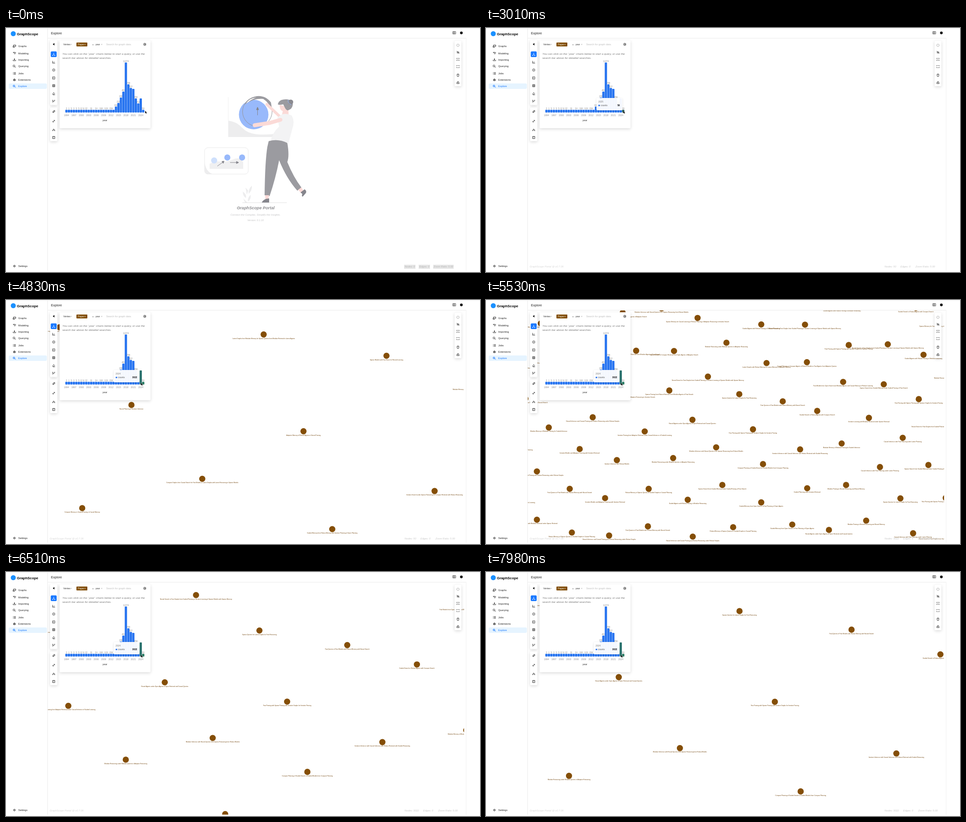
Animation of 1043x537 px, one loop 8000 ms. Source, as an HTML page with a canvas:

```html
<!DOCTYPE html>
<html lang="en">
<head>
<meta charset="utf-8">
<title>Explore</title>
<style>
html, body { margin: 0; width: 100%; height: 100%; overflow: hidden; background: #fff; }
canvas, svg { position: absolute; left: 0; top: 0; }
text { font-family: "Liberation Sans", Arial, sans-serif; white-space: pre; }
.card { fill: #fff; filter: drop-shadow(0 2px 3px rgba(0,0,0,.15)); }
.line { fill: none; stroke: #333; stroke-width: .9; }
.i { font-style: italic; }
.b { font-weight: 700; }
.m { text-anchor: middle; }
</style>
</head>
<body>
<canvas id="graph" width="1043" height="537"></canvas>
<svg width="1043" height="537" viewBox="0 0 1043 537">
  <g stroke="#ececec" fill="none">
    <path d="M0 1.5H1043" stroke="#f4f4f4"/>
    <path d="M91.5 1V534M92 22.5H1012"/>
    <path d="M1012.5 22V534" stroke-dasharray="2 1"/>
  </g>

  <g id="art">
    <path d="M489 204Q507 206 519 219T552 234Q580 236 600 231L590 240H489Z" fill="#ededee"/>
    <path d="M489 204V152M489 239.500H590" stroke="#efefef" fill="none"/>
    <circle cx="545" cy="190.500" r="32.500" fill="#98b9fb"/>
    <circle cx="553" cy="184" r="32.500" fill="none" stroke="#96969c"/>
    <path d="M524 169Q533 153 552 150Q571 148 583 164L586 183Q579 164 566 156Q545 154 524 169Z" fill="#9b9ba0"/>
    <path d="M551 153Q542 156 533 163L528 166Q536 154 551 153Z" fill="#fff"/>
    <path d="M553.500 192V176M551 180L553.500 174L556 180Z" stroke="#85858c" fill="#85858c"/>
    <path d="M607 199L574 168" stroke="#fbdad7" stroke-width="6" stroke-linecap="round"/>
    <path d="M602 169Q602 181 609 183L607 192L622 194L621 174Z" fill="#fbdad7"/>
    <path d="M600 163Q605 156 618 157Q632 158 631 169Q630 178 621 181Q617 182 614 176L610 168Q601 170 598 168Z" fill="#9b9ba0"/>
    <circle cx="626.500" cy="163" r="5.500" fill="#8b8b91"/>
    <path d="M621 158Q619 165 628 169" fill="none" stroke="#98b9fb"/>
    <path d="M607 190Q618 187 629 193Q636 206 630 222L622 252H581Q587 229 601 217L597 197Z" fill="#f3f3f4"/>
    <path d="M604 202L580 209L547 214" fill="none" stroke="#fbdad7" stroke-width="8.500" stroke-linecap="round" stroke-linejoin="round"/>
    <path d="M578 249Q599 243 619 253Q624 281 619 295Q633 329 650 351L641 358Q617 331 601 291Q593 332 580 370L569 368Q570 293 575 262Z" fill="#9b9ba0"/>
    <path d="M570 368H579L577 378H571ZM643 356L650 351L655 359L650 364Z" fill="#fbdad7"/>
    <path d="M563 384Q565 379 572 376L579 375V384ZM648 362L657 355Q662 358 660 363L653 371Q650 371 652 365Z" fill="#85858c"/>
    <path d="M520 384.500H618" stroke="#e2e2e2"/>
    <path d="M527 351L533 358L530 367ZM541 347Q542 357 534 365Q533 354 541 347ZM521 360Q530 366 528 374Q521 370 521 360ZM538 367Q530 376 533 382Q540 376 538 367ZM522 375L531 384H526Z" fill="#ededee"/>
    <rect x="437" y="263.500" width="96" height="58" rx="7" fill="#fff" stroke="#e9e9ea"/>
    <path d="M437 294Q439 316 455 321.500H444Q437 321 437 314Z" fill="#ededee"/>
    <path d="M448 310V299Q460 292 472 294T500 289T522 296V310Z" fill="#f0f0f1"/>
    <circle cx="458" cy="291.500" r="6.700" fill="#cfe0fc"/>
    <circle cx="487" cy="285" r="6.700" fill="#98b9fb"/>
    <circle cx="519.500" cy="285" r="6.700" fill="#98b9fb"/>
    <path d="M465 304L479 294M475 293.500L480 293L478 298ZM493 296H509M507 293.500L512 296L507 298.500Z" stroke="#85858c" fill="#85858c"/>
    <g fill="#8f8f92" class="i m">
      <text x="549.500" y="398.500" font-size="9.200" class="b">GraphScope Portal</text>
      <g fill="#c4c4c6">
        <text x="549" y="413" font-size="5.700">Connect the Complex, Simplify the Insights.</text>
        <text x="549" y="425" font-size="5.400">Version: 0.1.16</text>
      </g>
    </g>
  </g>

  <g id="foot" font-size="5.600" class="i"></g>

  <circle cx="16" cy="12.500" r="5.500" fill="#1a90ff"/>
  <text x="24" y="15.500" font-size="7.900" class="b">GraphScope</text>
  <text x="99" y="14" font-size="7.100" fill="#222">Explore</text>
  <path class="line" d="M983 8H986V13H983ZM986 8H989.500V13H986Z"/>
  <circle cx="1002" cy="10.700" r="3" fill="#111"/>

  <rect x="6" y="122" width="84" height="12" rx="3" fill="#e6f4ff"/>
  <g id="menu" font-size="5.600"></g>

  <rect class="card" x="97" y="26.500" width="16" height="143" rx="2"/>
  <rect class="card" x="97" y="175" width="16" height="74" rx="2"/>
  <rect class="card" x="118" y="27" width="200" height="193.500" rx="2"/>
  <rect class="card" x="987" y="28" width="15" height="100" rx="2"/>
  <path d="M106.500 33V38.500L103 35.700Z"/>
  <rect x="98.500" y="51.500" width="13" height="12.500" rx="2" fill="#1677ff"/>
  <g id="tools"></g>

  <g font-size="5.600" fill="#333">
    <text x="126" y="38">Vertex</text>
    <text x="142" y="38" fill="#999">×</text>
    <rect x="155" y="32" width="24" height="8.500" rx="1" fill="#7f4a00"/>
    <text x="158" y="38" fill="#fff" font-size="5.400">Paper×</text>
    <text x="190" y="38" font-size="5">»</text>
    <text x="197" y="38" font-size="5">year</text>
    <text x="209" y="38" fill="#999">×</text>
    <text x="220.500" y="38" fill="#bcbcbc">Search for graph data.</text>
  </g>
  <circle class="line" cx="305.300" cy="36" r="2.600"/>
  <path class="line" d="M304 36H307M305.500 34.700V37.300"/>
  <g font-size="6.150" fill="#777" class="i">
    <text x="124" y="59">You can click on the `year` charts below to start a query, or use the</text>
    <text x="124" y="67.500">search bar above for detailed searches.</text>
  </g>
  <g id="chart" class="m"></g>
  <text x="217.500" y="205" font-size="5.500" fill="#333" class="m">year</text>

  <g id="tip">
    <rect x="243" y="154" width="57" height="27" rx="2" fill="#fff" opacity=".95" style="filter:drop-shadow(0 1px 2px rgba(0,0,0,.12))"/>
    <text id="tipYear" x="247" y="163.500" font-size="5" fill="#777"></text>
    <circle cx="249" cy="170.500" r="1.800" fill="#2774f0"/>
    <text x="252.500" y="172.300" font-size="5" fill="#555">counts</text>
    <text id="tipCount" x="294.500" y="172.300" font-size="4.800" text-anchor="end" class="b"></text>
  </g>
  <path id="cursor" d="M0 0V6L1.500 4.800L2.500 7L3.600 6.500L2.600 4.400H4.400Z" stroke="#fff" stroke-width=".3"/>
</svg>
<script>
const $ = id => document.getElementById(id);
const text = (x, y, s, extra = '') => `<text x="${x}" y="${y}" ${extra}>${s}</text>`;
const icon = (x, y, d, color = '#333') =>
  `<path class="line" style="stroke:${color}" transform="translate(${x} ${y})" d="${d}"/>`;

const menu = [
  ['Graphs', 39.5, 'M-2 -2H3V1H-2ZM-3 0V3H1'],
  ['Modeling', 55.5, 'M-3 -2H2M-2 -2L1 2M3 -2L1 2'],
  ['Importing', 69.5, 'M0 -3V1M-1.500 -.5L0 1L1.500 -.5M-3 1V2.500H3V1'],
  ['Querying', 84, 'M1 -.5A2 2 0 1 0 -3 -.5A2 2 0 1 0 1 -.5M.5 1L3 3'],
  ['Jobs', 100, 'M-1 -2H3M-1 0H3M-1 2H3M-3 -2H-2M-3 0H-2M-3 2H-2'],
  ['Extensions', 114, 'M-2 -1H2V2H-2ZM-1 -2H1M-1 0H1M-1 1H1'],
  ['Explore', 128, 'M1 -.5A2 2 0 1 0 -3 -.5A2 2 0 1 0 1 -.5M.5 1L3 3M-2 -.5H0'],
  ['Settings', 524, 'M2 0A2 2 0 1 0 -2 0A2 2 0 1 0 2 0M-1 0H1']
];
$('menu').innerHTML = menu.map(([name, y, d]) => {
  const color = name === 'Explore' ? '#1677ff' : '#222';
  return icon(18.5, y, d, color) + text(27, y + 2, name, `fill="${color}"`);
}).join('');

const round = 'M2.700 0A2.700 2.700 0 1 0 -2.700 0A2.700 2.700 0 1 0 2.700 0';
const box = 'M-2.500 -2.500H2.500V2.500H-2.500Z';
const corners = 'M-2.500 -1V-2.500H-1M1 -2.500H2.500V-1M2.500 1V2.500H1M-1 2.500H-2.500V1';
const tools = [
  [57.7, 'M0 -3V0L-3 3M0 0L3 3M-3 3H-1M1 3H3'],
  [75, 'M-2.500 -2.500V2.500H3M-1 1V0M1 1V-1'], [92.5, round + 'M-1 0H1'],
  [110, box + 'M-1 -1L0 0L-1 1'], [127, box + 'M-2 0H2M0 -2V2'],
  [144.5, 'M0 -2.500L2 0L0 2H-2V0ZM-2 2.500H3'], [161, 'M-2 -2V3M2 -2Q2 1 -2 1M-3 -2H-1M1 -2H3'],
  [184, 'M-2 2L2 -2M-2 2H0L3 -1L1 -3L-2 0Z'], [205, 'M-2 2L2 -2M0 -2H2V0M-2 0V2H0'],
  [224, 'M0 -2.500V0M-2 2V0H2V2M-3 2H-1M1 2H3'], [241, box + 'M-1 -1H1M-1 1H0']
];
const sideTools = [
  [38, round], [53, 'M-2 2L-1 -1Q0 -3 2 0L2 2ZM-3 -2L3 3'], [69, corners + 'M-.7 0H.7'],
  [85, corners], [104, 'M-2.500 -2H2.500M-1 -3H1M-2 -2L-1.600 2.500H1.600L2 -2'],
  [120, 'M-2.500 0V2.500H2.500V0ZM-1 -2H2M-2 -1H0']
];
$('tools').innerHTML =
  tools.map(([y, d], i) => icon(105, y, d, i ? '#333' : '#fff')).join('') +
  sideTools.map(([y, d], i) => icon(994.5, y, d, i ? '#333' : '#aaa')).join('');

// Bar chart: one bar per year, 1994 to 2025
const tops = [173, 165, 153, 140, 76, 124, 132, 134, 155, 166, 155, 180];
const counts = '2,1,5,3,5,5,12,6,22,,31,,24,,190,,103,,236,,332,210,246,491,11374,788,827,,256,714,,50'.split(',');
const barX = i => 133 + 5.45 * i;
$('chart').innerHTML = counts.map((n, i) => {
  const x = barX(i), y = i < 20 ? 180 : tops[i - 20];
  return `<rect id="bar${i}" x="${x - 2.5}" y="${y}" width="5" height="${186 - y}" rx="1" fill="#2774f0"/>` +
    text(x, y - 1.5, n, 'font-size="4.700" fill="#888"') +
    (i % 3 ? '' : `<path d="M${x} 186V188" stroke="#ccc" stroke-width=".5"/>` +
      text(x, 193.7, 1994 + i, 'font-size="5" fill="#8a8a92"'));
}).join('');

// Graph nodes: x, y, label width
let seed = 7;
const rand = () => (seed = seed * 16807 % 2147483647) / 2147483647;
const pick = list => list[Math.floor(rand() * list.length)];
const words = {
  a: 'Adaptive,Sparse,Robust,Neural,Causal,Latent,Fast,Modular,Guided,Compact,Iterative,Open'.split(','),
  n: 'Models,Retrieval,Reasoning,Planning,Graphs,Inference,Search,Learning,Agents,Parsing,Queries,Memory'.split(','),
  c: 'for,with,of,in,and,from,under'.split(',')
};
function title(width) {
  const size = width / 1.6;
  let best = '';
  for (let k = 0; k < 40; k++) {
    let s = pick(words.a) + ' ' + pick(words.n);
    while (s.length < size - 10) s += ` ${pick(words.c)} ${pick(words.a)} ${pick(words.n)}`;
    if (Math.abs(s.length - size) < Math.abs(best.length - size)) best = s;
  }
  return best;
}

// Listed nodes fill the view; a sunflower spiral continues outside it
function layout(flat, gap, total) {
  const nodes = [];
  for (let i = 0; i < flat.length; i += 3) nodes.push([flat[i], flat[i + 1], title(flat[i + 2])]);
  const listed = nodes.length;
  for (let i = 0; i < total; i++) {
    const r = gap * Math.sqrt(i + .5), a = i * Math.PI * (3 - Math.sqrt(5));
    const x = 552 + r * Math.cos(a), y = 285 + r * Math.sin(a);
    if (Math.abs(x - 550) > 485 || Math.abs(y - 284) > 262) nodes.push([x, y, nodes[i % listed][2]]);
  }
  return nodes;
}
const small = layout([
  637, 288, 80, 454, 374, 169, 565, 113, 147, 689, 465, 116, 326, 240.5, 60,
  787, 151.5, 79, 404, 31, 178, 874, 396, 133, 237, 427, 79, 196, 100, 90,
  966, 205, 150, 86, 309, 142
], 112, 50);
const large = layout([
  650, 60, 110, 787, 57, 139, 451, 106, 170, 910, 124, 135, 320, 153, 114,
  557.5, 165.5, 82, 705, 190, 100, 822, 222.5, 80, 398.5, 252.5, 109,
  236.5, 292, 132, 604, 285, 121, 997.5, 246, 103, 479, 346, 125, 764, 353, 137,
  905, 333, 87, 333, 382.5, 97, 142, 389.5, 67, 638, 403, 115, 500, 474, 109,
  250, 487, 107, 788, 485, 71, 920, 474, 85, 102, 518.5, 102, 382.5, 524, 87,
  632, 533, 100, 336, 19, 112, 1035, 413, 92, 60, 244, 122, 165, 162, 150
], 75.3, 1600);

const ctx = $('graph').getContext('2d');
ctx.beginPath();
ctx.rect(92, 22, 916, 512);
ctx.clip();
ctx.font = '3.2px "Liberation Sans", Arial, sans-serif';
ctx.textAlign = 'center';

function drawNodes(nodes, scale, cx) {
  for (const [nx, ny, label] of nodes) {
    const x = cx + (nx - cx) * scale, y = 284 + (ny - 284) * scale;
    if (x < -20 || x > 1110 || y < 5 || y > 545) continue;
    ctx.fillStyle = '#844e06';
    ctx.beginPath();
    ctx.arc(x, y, 6.8, 0, 7);
    ctx.fill();
    ctx.fillStyle = '#6b3c00';
    ctx.fillText(label, x, y + 9.8);
  }
}

const clamp = v => Math.max(0, Math.min(1, v));
const ramp = (t, from, to) => clamp((t - from) / (to - from));
const spread = (t, start, tau) => 1 - Math.exp((start - t) / tau);

function footer(t) {
  if (t < 2450) {
    return [['Nodes: 0', 876, 25], ['Edges: 0', 908, 25], ['Zoom Ratio: 5.00', 940, 45]].map(([s, x, w]) =>
      `<rect x="${x}" y="521" width="${w}" height="9" fill="#e6e6e6"/>` +
      text(x + w / 2, 527.3, s, 'class="m" fill="#b4b4b4"')).join('');
  }
  const many = t >= 5110, shift = many ? 6 : 0;
  return '<g fill="#c8c8c8">' + text(96, 527.3, 'GraphScope Portal @ v0.7.06', 'fill="#d6d6d6"') +
    text(877, 527.3, 'Nodes: ' + (many ? 3022 : 50)) + text(912 + shift, 527.3, 'Edges: 0') +
    text(945 + shift, 527.3, 'Zoom Ratio: 5.00') + '</g>';
}

let last = -1;
function frame(now) {
  const t = Math.floor(now % 8000 / 70) * 70;
  if (t !== last) draw(last = t);
  requestAnimationFrame(frame);
}

function draw(t) {
  ctx.clearRect(0, 0, 1043, 537);
  if (t >= 3080 && t < 4970) drawNodes(small, 1.221 * spread(t, 3040, 310), 556);
  if (t >= 5110) drawNodes(large, 1.815 * spread(t, 5013, 1170), 557);

  $('art').setAttribute('opacity', 1 - ramp(t, 1540, 1890));
  $('foot').innerHTML = footer(t);

  const moved = t >= 4480;
  const x = 306 - 4 * ramp(t, 560, 840) - 5 * ramp(t, 4270, 4550);
  $('cursor').setAttribute('transform', `translate(${x} 182)`);
  $('tip').setAttribute('opacity', ramp(t, 630, 980));
  $('tip').setAttribute('transform', `translate(${-6 * ramp(t, 4410, 4690)} 0)`);
  $('tipYear').textContent = moved ? 2024 : 2025;
  $('tipCount').textContent = moved ? 3022 : 50;
  $('bar31').setAttribute('fill', t < 700 ? '#2774f0' : moved ? '#2f7d66' : '#1f5f5a');
  $('bar30').setAttribute('fill', moved ? '#2f7672' : '#2774f0');
}
requestAnimationFrame(frame);
</script>
</body>
</html>
```
